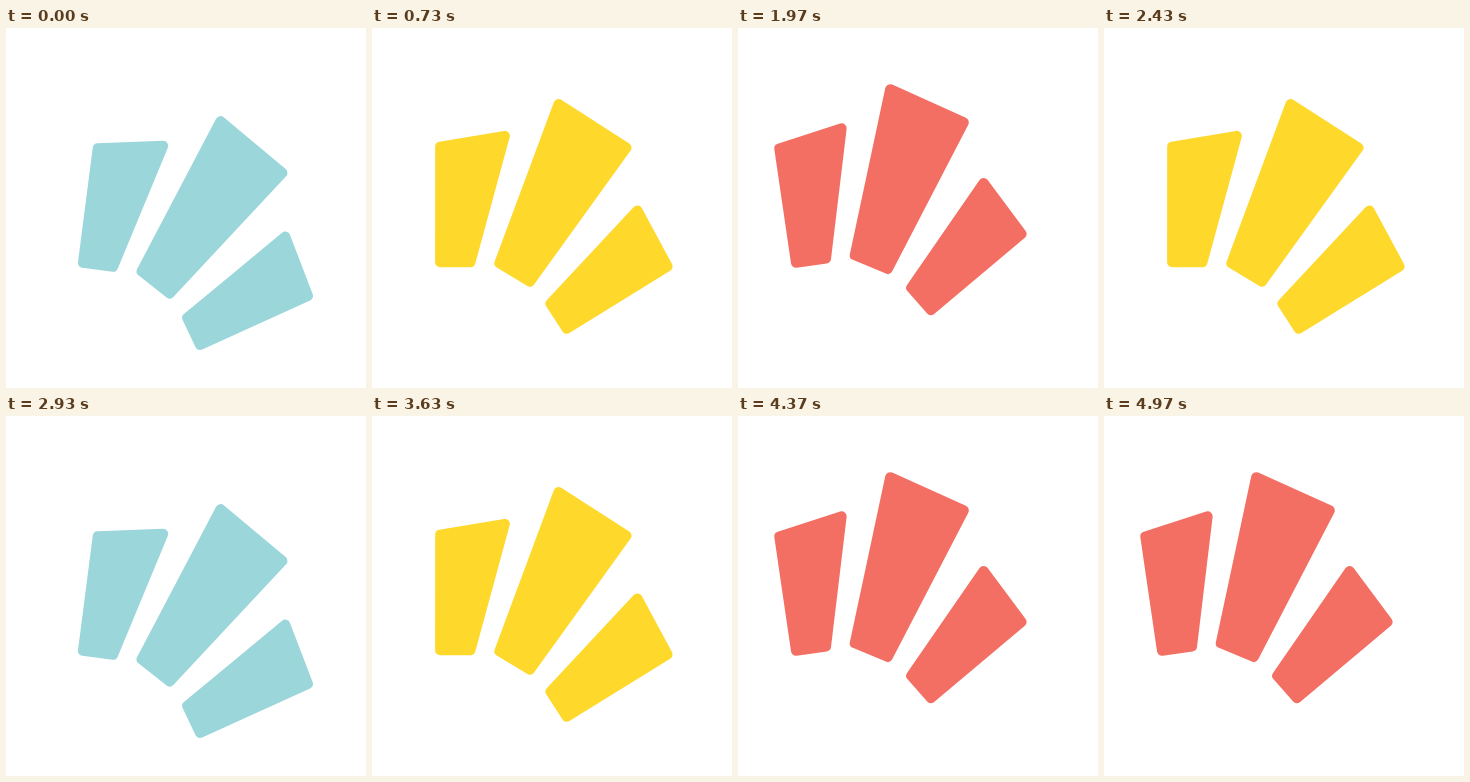
An HTML page with a canvas for the animation above (5030 ms loop, 360 by 360 pixels).

```html
<!DOCTYPE html>
<html lang="en">
<head>
<meta charset="utf-8">
<title>Three rays</title>
<style>
  html, body { margin: 0; width: 100%; height: 100%; overflow: hidden; background: #fff; }
  canvas { display: block; width: 360px; height: 360px; }
</style>
</head>
<body>
<canvas id="stage" width="360" height="360"></canvas>
<script>
const ctx = document.getElementById('stage').getContext('2d');
const SIZE = 360;
const LOOP = 5030;
const HOLD = 726;
const RADIUS = 5;
const PIVOT = { x: 67.3, y: 303.9 };

// Unrounded corners of the three rays in the upright pose.
const rays = [
  [[63.2, 114.4], [139.7, 101.6], [102.3, 239.3], [63.1, 239.2]],
  [[184, 68.5], [261.7, 118.3], [159.4, 260.3], [121.2, 237.4]],
  [[266.5, 173.9], [302.2, 240.2], [193.2, 307.6], [172.1, 275]]
];

// The fan swings about its pivot, one colour per angle (degrees).
const blue = { color: '#9bd6da', angle: 7.3 };
const yellow = { color: '#fed82b', angle: 0 };
const red = { color: '#f36f63', angle: -8.35 };
const swing = [blue, yellow, red, yellow];

function fillRounded(points) {
  const [startX, startY] = points[0];
  const [endX, endY] = points[points.length - 1];
  ctx.beginPath();
  ctx.moveTo((startX + endX) / 2, (startY + endY) / 2);
  points.forEach(([x, y], i) => {
    const [nextX, nextY] = points[(i + 1) % points.length];
    ctx.arcTo(x, y, nextX, nextY, RADIUS);
  });
  ctx.closePath();
  ctx.fill();
}

function draw(time) {
  const beat = Math.floor((time % LOOP) / HOLD);
  const { color, angle } = swing[beat % swing.length];
  ctx.fillStyle = '#fff';
  ctx.fillRect(0, 0, SIZE, SIZE);
  ctx.save();
  ctx.translate(PIVOT.x, PIVOT.y);
  ctx.rotate(angle * Math.PI / 180);
  ctx.translate(-PIVOT.x, -PIVOT.y);
  ctx.fillStyle = color;
  rays.forEach(fillRounded);
  ctx.restore();
}

const begin = performance.now();
function tick() {
  draw(performance.now() - begin);
  requestAnimationFrame(tick);
}
tick();
</script>
</body>
</html>
```
